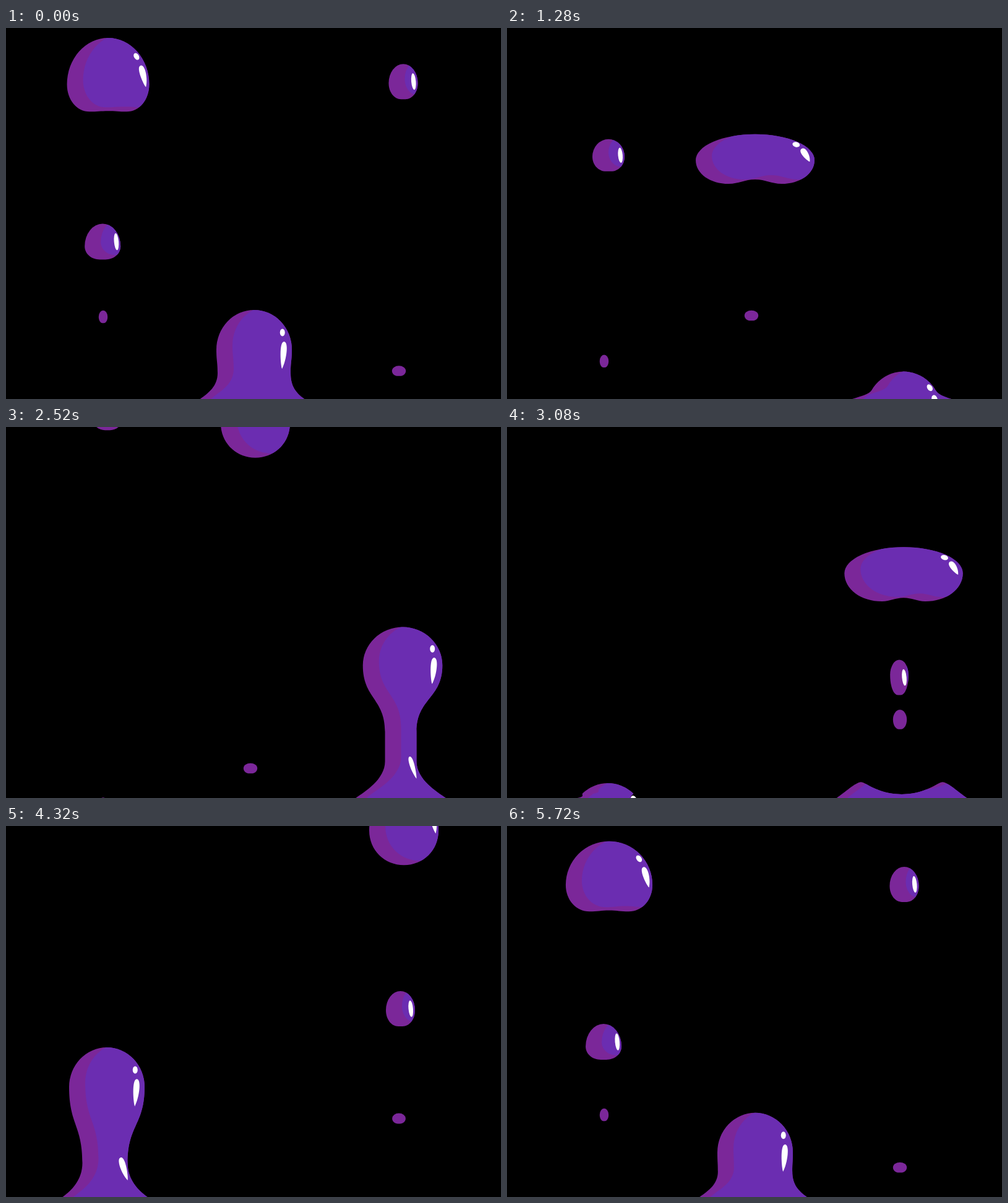
Animation, 800 px wide and 600 px high, one loop 5.76 s. Source, as an HTML page with a canvas:

```html
<!DOCTYPE html>
<html lang="en">
<head>
<meta charset="utf-8">
<title>Lava blobs</title>
<style>
  html, body { margin: 0; width: 100%; height: 100%; overflow: hidden; background: #000; }
  canvas { display: block; }
</style>
</head>
<body>
<canvas id="stage" width="800" height="600"></canvas>
<script>
const LOOP = 5760, STEP = 40, LEAD = 920;
const PINCH = 940; // the big blob tears off its stem
const DARK = '#7b2799', LIGHT = '#6b2db1';
const ctx = document.getElementById('stage').getContext('2d');

// Droplet: w, h half size; young share of the width at birth; swell time of its bulge.
// Speck: y where it hangs, time it lets go, fall speed.
const COLUMNS = [
  { x: 163, start: 3840,
    drop: { w: 26, h: 26, young: 0.95, swell: 1900, lift: 4.9e-9 },
    speck: { y: 467, hang: 1940, fall: 0.057 } },
  { x: 401, start: 0,
    speck: { y: 465, hang: 1940, fall: 0.15 } },
  { x: 641, start: 1880,
    drop: { w: 23.5, h: 28.5, young: 0.55, swell: 3240, lift: 5.4e-9 },
    speck: { y: 473, hang: 2450, fall: 0.057 } }
];

const clamp = v => Math.min(1, Math.max(0, v));
const mix = (a, b, k) => a + (b - a) * k;
const ease = (a, b, p) => {
  const k = clamp((p - a) / (b - a));
  return k * k * (3 - 2 * k);
};

// Right-half curves [control, control, end] from a start point, mirrored to the left.
// A point is [x, y, lean]; lean moves both sides the same way.
function mirrored(path, cx, start, curves) {
  const right = ([x, y, lean = 0]) => [cx + lean + x, y];
  const left = ([x, y, lean = 0]) => [cx + lean - x, y];
  for (const c of curves) path.bezierCurveTo(...c.flatMap(right));
  path.lineTo(...left(curves[curves.length - 1][2]));
  for (let i = curves.length - 1; i >= 0; i--) {
    const end = i ? curves[i - 1][2] : start;
    path.bezierCurveTo(...[curves[i][1], curves[i][0], end].flatMap(left));
  }
  path.closePath();
  return path;
}

function dome(cx, cy, w, up, spread) {
  const path = new Path2D(), top = -Math.PI / 2;
  path.ellipse(cx, cy, w, up, 0, top - spread, top + spread);
  return path;
}

// Free floating body: half ellipse above, two lobes with a dent below.
function floating(cx, cy, w, up, down, lobe = 0, dent = 0) {
  const low = cy + down;
  return mirrored(dome(cx, cy, w, up, Math.PI / 2), cx, [w, cy], [
    [[w, cy + down * 0.57], [mix(lobe, w, 0.56), low], [lobe, low]],
    [[lobe * 0.6, low], [lobe * 0.4, low - dent], [0, low - dent]]
  ]);
}

function goo(path) {
  ctx.fillStyle = DARK;
  ctx.fill(path);
  ctx.save();
  ctx.clip(path);
  ctx.translate(26, -7);
  ctx.fillStyle = LIGHT;
  ctx.fill(path);
  ctx.restore();
}

function oval(x, y, rx, ry, angle) {
  ctx.fillStyle = '#fff';
  ctx.beginPath();
  ctx.ellipse(x, y, rx, ry, angle, 0, Math.PI * 2);
  ctx.fill();
}

function streak(x, y, tx, ty, r, flip = 1) {
  const len = Math.hypot(tx - x, ty - y);
  ctx.save();
  ctx.translate(x, y);
  ctx.rotate(Math.atan2(ty - y, tx - x) - Math.PI / 2);
  ctx.scale(flip, 1);
  ctx.fillStyle = '#fff';
  ctx.beginPath();
  ctx.moveTo(0, -r);
  ctx.bezierCurveTo(r * 1.5, -r, r * 1.3, len * 0.6, 0, len);
  ctx.bezierCurveTo(-r * 0.5, len * 0.9, -r * 1.8, -r, 0, -r);
  ctx.fill();
  ctx.restore();
}

// Top edge of the big blob.
function topAt(p) {
  if (p < 0) return 456 - 0.196 * p - 5e-5 * p * p + 25 * (1 - ease(-LEAD, -760, p));
  const q = Math.min(p, 1920);
  const hop = 11 * Math.sin(Math.PI * clamp((p - 1160) / 760));
  return 456 - 0.1958 * q - 1.736e-5 * q * q - hop - 0.169 * (p - q);
}

function bigBlob(x, p) {
  const flat = ease(500, 1240, p) * (1 - ease(1560, 2040, p));
  const w = 61 + 35 * flat - 5 * ease(1900, 2400, p);
  const up = 64 - 22 * flat + 15 * ease(1700, 1950, p);
  const top = topAt(p), cy = top + up;
  if (p < PINCH) {
    rooted(x, p, w, up, cy);
  } else {
    const tail = 1 - ease(PINCH, 1300, p);
    const round = Math.max(tail, ease(1920, 2400, p));
    x += 2 * ease(1240, 1900, p);
    goo(floating(x, cy, w, up,
      38 + 18 * ease(1600, 2400, p) + 40 * tail,
      w * 0.45 * (1 - round), 7 * flat * (1 - round)));
  }
  shine(x, top, p, w, up);
}

// Blob still joined to the pool: head, neck and flared foot.
function rooted(x, p, w, up, cy) {
  const spread = Math.min(90, 90 + 0.105 * (p + 300)) * Math.PI / 180;
  const sin = Math.sin(spread), cos = Math.cos(spread);
  const head = [w * sin, cy - up * cos];
  const curves = [];
  let neck = head;

  if (p > -300) {
    const lean = -3 * ease(0, 480, p);
    const n = Math.min(w, 59 - 0.03 * p - 3.5e-5 * p * p);
    const y = Math.max(cy + 1, 558 - 0.027 * p);
    const high = y - Math.max(0, p - 480) * 0.3, mid = (cy + high) / 2;
    neck = [n, y, lean];
    curves.push(
      [[w, mid], [n, mid, lean], [n, high, lean]],
      [[n, high, lean], neck, neck]);
  }

  const [nx, ny, lean = 0] = neck;
  const spill = p < -400
    ? mix(45, 124, clamp((p + 760) / 360))
    : 62 + 62 * Math.exp(-(p + 400) / 390) + Math.max(0, p - 480) * 0.04;
  const foot = Math.max(600, ny + 6), b = Math.max(spill, nx + 6), drop = foot - ny;
  const end = [b, foot, -3], out = [b + 30, foot + 24, -3];
  curves.push(
    [[nx + cos * drop / 2, ny + sin * drop / 2, lean], [b - 14, foot - Math.min(10, drop / 3), -3], end],
    [end, out, out]);
  goo(mirrored(dome(x, cy, w, up, spread), x, head, curves));

  if (p > 10) {
    const lx = x + lean + nx;
    streak(lx - 10, ny - 4, lx, ny + 28, 5 * clamp((nx - 10) / 20), -1);
  }
}

// Highlights sit at fixed shares of the head's size.
function shine(x, top, p, w, up) {
  const k = 1 - ease(-680, -100, p) + ease(600, 1200, p);
  const at = (ax, ay, bx, by) => [x + w * mix(ax, bx, k), top + up * mix(ay, by, k)];
  const slope = Math.atan(1.3 * (up / w) ** 2);
  oval(...at(0.75, 0.57, 0.69, 0.4), 6, 4, mix(Math.PI / 2, slope, k));
  streak(...at(0.79, 0.88, 0.81, 0.66), ...at(0.74, 1.49, 0.92, 1.06), 5);
}

// What is left of the stem sinks and runs outwards as a ring.
function crown(x, p) {
  const s = (p - PINCH) / 300;
  const rim = 4 + 110 * s ** 4, y = 500 + 99 * s * s;
  const dip = 500 + 125 * s * s, edge = 84 + 50 * s ** 6;
  const path = new Path2D();
  path.moveTo(x, dip);
  goo(mirrored(path, x, [0, dip], [
    [[rim * 0.6, dip], [rim * 0.88, y], [rim, y]],
    [[rim + 8, y], [edge - 12, Math.max(592, y)], [edge, Math.max(600, y + 4)]],
    [[edge, 600], [edge + 30, 624], [edge + 30, 624]]
  ]));
}

function droplets({ x, drop, speck }, p) {
  const born = ease(880, 1180, p);
  const grown = drop ? mix(drop.young, 1, ease(PINCH, 1900, p)) : 1;
  const thread = 1 - born;

  if (drop) {
    const age = p - 1200;
    const bulge = Math.exp(-(((p - drop.swell) / 300) ** 2));
    const w = (drop.w * grown + 3 * bulge) * born;
    const h = (drop.h + 3 * bulge * (drop.w > drop.h - 1)) * (1 + thread / 2);
    const taper = 0.08 + 0.18 * bulge - 0.6 * (1 - grown);
    const cx = x - 7 + 8 * ease(1800, 3200, p);
    const y = 405 - 0.08 * age - drop.lift * age ** 3;
    goo(floating(cx, y + h * taper, w, h * (1 + taper), h * (1 - taper), w * 0.15));
    if (w > 14) oval(cx + w - 6.8, y, 3.7, Math.min(13.8, h * 0.47), -0.09);
  }

  const wave = Math.cos(Math.PI * (p - 1240) / 660);
  const w = (9.2 + 2 * wave) * born;
  const h = 9.3 - wave + 20 * (1 - grown) + 15 * thread;
  const y = speck.y + Math.max(0, p - speck.hang) * speck.fall;
  goo(floating(x - 6, y, w, h, h, w * 0.15));
}

function column(col, time) {
  let p = (time - col.start + LOOP) % LOOP;
  if (p >= LOOP - LEAD) p -= LOOP;
  if (p >= PINCH && p < 1280) crown(col.x - 3, p);
  if (p >= PINCH) droplets(col, p);
  if (p < 2900) bigBlob(col.x, p);
}

const began = performance.now();
function draw() {
  const time = Math.floor((performance.now() - began) % LOOP / STEP) * STEP;
  ctx.fillStyle = '#000';
  ctx.fillRect(0, 0, 800, 600);
  for (const c of COLUMNS) column(c, time);
  requestAnimationFrame(draw);
}
draw();
</script>
</body>
</html>
```
